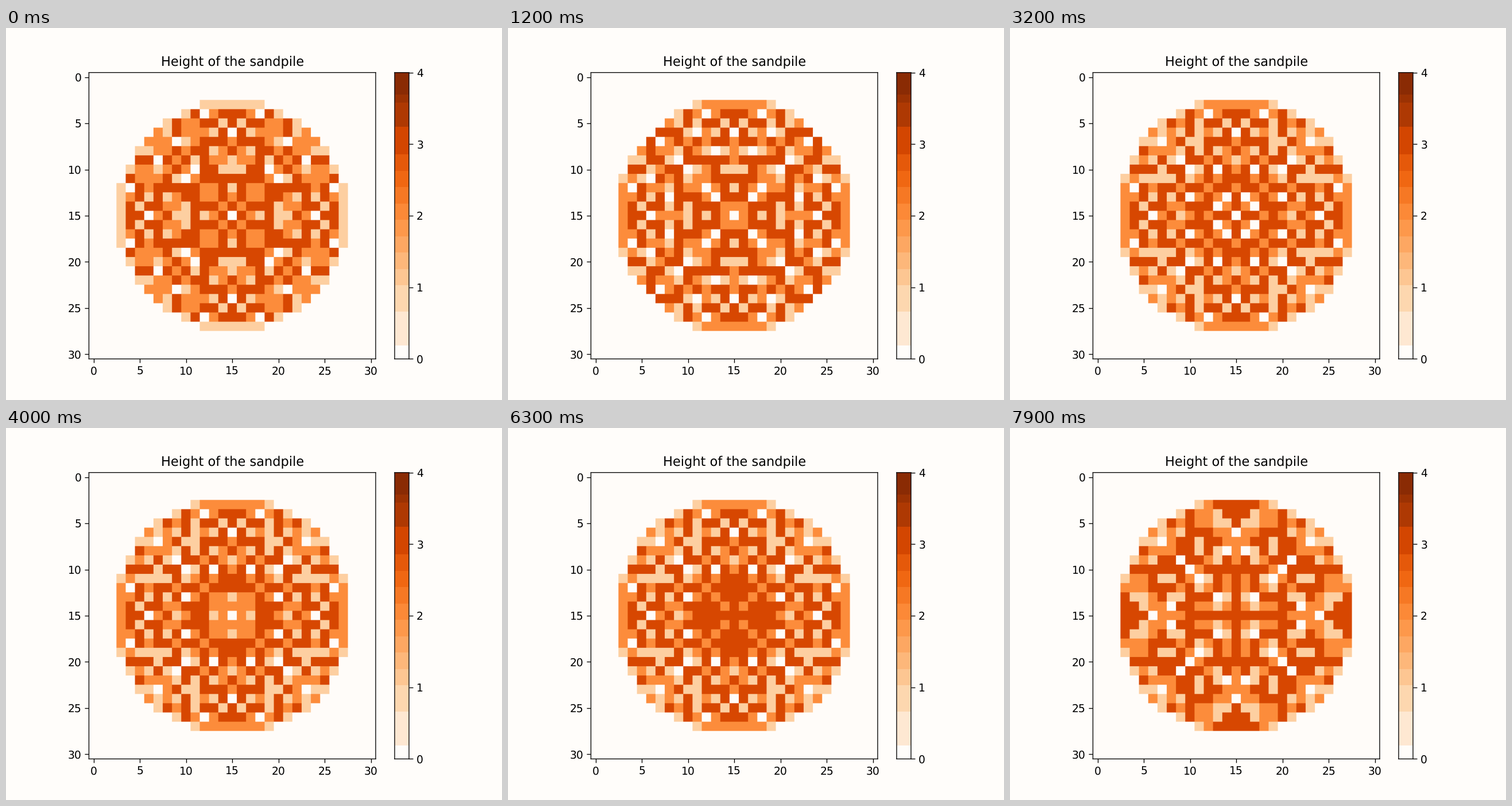
A matplotlib script that plays this animation: 864 by 648 pixels, repeating every 8 s.

```python
import matplotlib.pyplot as plt
import numpy as np
from matplotlib.animation import FuncAnimation
from matplotlib.colors import ListedColormap
from matplotlib.ticker import MultipleLocator

WIDTH, HEIGHT, DPI = 864, 648, 135
SIZE = 31
START = 1004      # grains already dropped when the loop begins
FRAMES = 80
PAPER = (1.0, 0.992, 0.98, 1.0)
TOP, BOTTOM = 77.6, 576.45

plt.rcParams.update({"path.snap": False, "text.hinting": "none",
                     "axes.linewidth": 0.72, "xtick.major.width": 0.72,
                     "ytick.major.width": 0.72})

shades = plt.get_cmap("Oranges")(np.linspace(0, 1, 256))
shades[:13] = PAPER
ramp = ListedColormap(shades)


def settle(pile):
    """Topple every cell holding four or more grains until stable."""
    while (pile > 3).any():
        spill = pile // 4
        pile -= 4 * spill
        pile[1:] += spill[:-1]
        pile[:-1] += spill[1:]
        pile[:, 1:] += spill[:, :-1]
        pile[:, :-1] += spill[:, 1:]


def drop(pile, grains=1):
    pile[SIZE // 2, SIZE // 2] += grains
    settle(pile)
    return pile.copy()


def paint(pile, zoom=24):
    """Enlarged colour image, so that cell edges come out smooth."""
    return ramp(pile / 4, bytes=True).repeat(zoom, 0).repeat(zoom, 1)


def panel(left, right):
    return fig.add_axes([left / WIDTH, 1 - BOTTOM / HEIGHT,
                         (right - left) / WIDTH, (BOTTOM - TOP) / HEIGHT])


pile = np.zeros((SIZE, SIZE), dtype=int)
states = [drop(pile, START)]
states += [drop(pile) for _ in range(FRAMES - 1)]

fig = plt.figure(figsize=(WIDTH / DPI, HEIGHT / DPI), dpi=DPI,
                 facecolor=PAPER)

ax = panel(144.45, 643.95)
image = ax.imshow(paint(states[0]), aspect="auto", interpolation="hanning",
                  extent=(-0.5, SIZE - 0.5, SIZE - 0.5, -0.5))
ax.set_title("Height of the sandpile")
ax.xaxis.set_major_locator(MultipleLocator(5))
ax.yaxis.set_major_locator(MultipleLocator(5))

# Colour bar: even bands in the middle, wider ones towards both ends
edges = np.r_[0, 0.19, 0.665, np.linspace(1.03, 2.86, 9), 3.245, 3.58, 3.7, 4]
middles = (edges[:-1] + edges[1:]) / 2
bar = panel(677, 702)
bar.pcolormesh([0, 1], edges, middles[:, None], cmap=ramp, vmin=0, vmax=4)
bar.yaxis.tick_right()
bar.set(xticks=[], yticks=range(5), ylim=(0, 4))


def update(i):
    image.set_data(paint(states[i]))
    return [image]


anim = FuncAnimation(fig, update, frames=FRAMES, interval=100,
                     repeat=True, repeat_delay=0)
plt.show()
```
